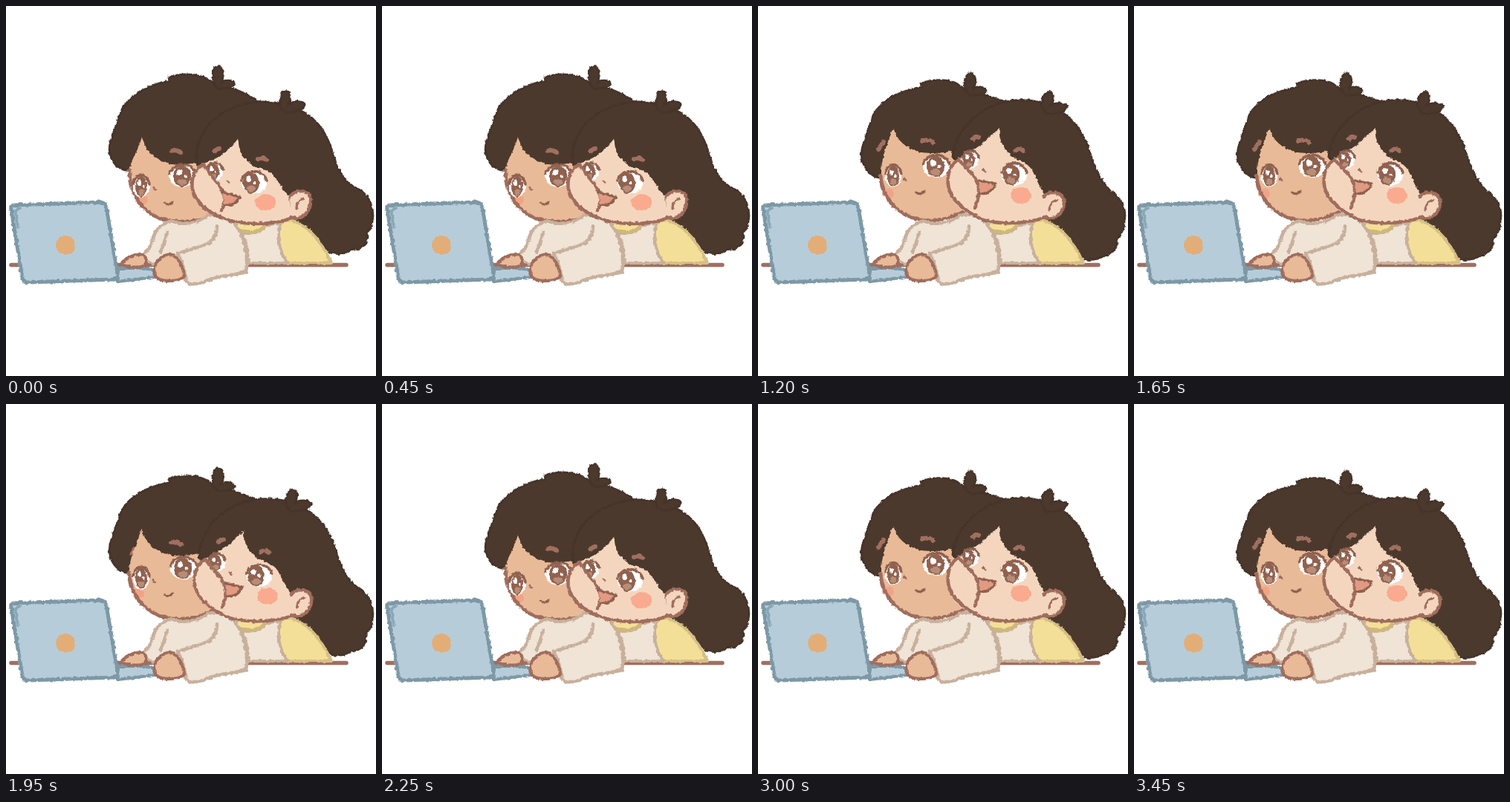
These frames come from a looping animation (498x498 px, 3600 ms). An HTML page:

```html
<!DOCTYPE html>
<html lang="en">
<head>
<meta charset="utf-8">
<style>
html, body { margin: 0; width: 100%; height: 100%; overflow: hidden; background: #fff; }
svg { display: block; width: 498px; height: 498px; }
path { stroke-linecap: round; stroke-linejoin: round; }
</style>
</head>
<body>
<svg viewBox="0 0 498 498">
  <filter id="crayon" x="0" y="0" width="498" height="498" filterUnits="userSpaceOnUse" color-interpolation-filters="sRGB">
    <feTurbulence type="fractalNoise" baseFrequency=".22" numOctaves="2" seed="4"/>
    <feDisplacementMap in="SourceGraphic" scale="4" xChannelSelector="R" yChannelSelector="G"/>
  </filter>
  <path d="M7 348.5H458" stroke="#a06f62" stroke-width="5.5"/>
  <g id="scene" filter="url(#crayon)"></g>
</svg>
<script>
const HAIR = '#4c392d', HAIR_LINE = '#46342a', BROW = '#a06f5f', LINE = '#a06d5d', IRIS = '#90614f';
const TAN = '#e9ba97', PALE = '#f4d6be', KNIT = '#efe4d5', KNIT_LINE = '#c8b09c', YELLOW = '#f4df98';
const BLUE = '#b6cdd9', BLUE_LINE = '#7d98a6';
const scene = document.getElementById('scene');
const moving = [];

// Adds a path; with a second pose it is blended between the two.
function add(fill, stroke, width, low, high) {
  const el = document.createElementNS('http://www.w3.org/2000/svg', 'path');
  el.setAttribute('fill', fill);
  el.setAttribute('stroke', stroke);
  el.setAttribute('stroke-width', width);
  el.setAttribute('d', low);
  scene.append(el);
  if (high) moving.push({ el, low, to: high.match(/-?[\d.]+/g).map(Number) });
}
const line = (color, width, low, high) => add('none', color, width, low, high);
const oval = (x, y, rx, ry) => `M${x - rx} ${y}a${rx} ${ry} 0 1 0 ${2 * rx} 0a${rx} ${ry} 0 1 0 ${-2 * rx} 0Z`;
const spot = (fill, [x, y], [u, v], rx, ry) => add(fill, 'none', 0, oval(x, y, rx, ry), oval(u, v, rx, ry));

function eye(low, high, rx, ry, whiteRx, whiteShift) {
  const at = (dx, dy) => [[low[0] + dx, low[1] + dy], [high[0] + dx, high[1] + dy]];
  const lash = ([x, y]) =>
    `M${x - whiteRx} ${y - 3}C${x - whiteRx * .7} ${y - ry * 1.4} ${x + whiteRx * .7} ${y - ry * 1.4} ${x + whiteRx} ${y - 3}`;
  spot('#fff', ...at(whiteShift, 0), whiteRx, ry + 1);
  spot(IRIS, ...at(0, 0), rx, ry);
  spot('#b78d77', ...at(0, ry * .55), rx * .55, ry * .3);
  spot('#fff', ...at(-rx * .3, -ry * .35), rx * .3, ry * .28);
  spot('#fff', ...at(rx * .4, 0), rx * .18, ry * .16);
  const [a, b] = at(whiteShift, 0);
  line(IRIS, 3.5, lash(a), lash(b));
}

// Boy's head
add(HAIR, HAIR_LINE, 3,
  'M168 221C150 223 136 206 140 184C146 166 150 155 156 140C165 122 190 106 220 101L219 96C235 91 250 91 262 95C273 98 278 102 281 106C305 108 325 119 345 132L345 200L255 215Z',
  'M168 232C150 231 136 212 140 192C146 173 150 160 156 146C165 128 190 114 222 109L219 104C235 99 250 98 264 103C272 106 276 110 281 115C300 118 315 122 335 130L345 200L255 215Z');
add(HAIR, HAIR_LINE, 3, 'M281 106C275 92 280 79 287 81C295 87 293 98 288 104C296 97 309 101 307 106C302 111 294 111 286 112Z',
  'M281 116C274 101 281 89 288 91C295 96 293 106 289 112C297 105 308 111 307 116C302 121 294 120 286 121Z');
line(BROW, 6, 'M181 214L182 213', 'M162 193L169 183');
add(TAN, 'none', 0,
  'M183 176C188 196 200 208 222 213C236 215 248 213 262 209L275 240L284 283C262 291 235 293 207 286C182 276 167 255 166 222C168 206 178 195 183 176Z',
  'M182 164C187 182 200 192 220 197C236 199 250 198 264 194L275 240L284 276C262 288 232 294 205 284C180 274 167 252 166 228C165 206 174 186 182 164Z');
spot('#f0a486', [183, 261], [175, 252], 8, 7);
line(LINE, 4.5, 'M166 222C167 252 182 276 207 286C235 293 260 290 280 282', 'M165 228C167 252 180 274 205 284C232 294 260 286 282 274');
line(BROW, 6, 'M223 195Q229 193 235 197', 'M222 181Q230 179 236 184');
eye([182, 243], [182, 229], 8, 14, 11, 0);
eye([237, 229], [239, 216], 12, 14, 18, 1);
line(LINE, 3, 'M199 245L201 247', 'M197 232L199 235');
line(IRIS, 3, 'M214 265Q219 270 224 264', 'M213 251Q219 255 224 249');

// Girl's hair
add(HAIR, HAIR_LINE, 3,
  'M258 215C253 190 262 162 295 142C320 128 350 125 380 134C415 145 432 168 440 200C448 225 455 238 475 247C490 255 496 275 493 290Q492 300 485 305C489 320 478 329 465 327C456 335 446 334 437 332L400 300L330 260Z',
  'M262 203C263 185 275 160 300 143C322 128 352 122 385 131C420 143 438 168 447 198C453 220 462 236 475 250C490 260 496 274 493 290Q493 304 483 312C484 326 477 334 466 336C458 341 448 342 440 341L400 300L330 260Z');
add(HAIR, HAIR_LINE, 3, 'M370 139C366 125 372 113 378 115C384 120 383 128 379 134C387 126 402 128 402 133C399 141 388 143 377 143Z',
  'M384 139C379 126 387 113 394 116C400 121 398 129 394 134C402 128 416 132 416 136C412 144 401 145 388 145Z');

// Girl's body
add(YELLOW, '#d6bf86', 4, 'M303 293L382 288C405 292 425 318 438 346L330 346Z');
add(KNIT, KNIT_LINE, 3.5, 'M316 305Q337 310 350 295L370 292Q361 320 379 346L326 346Q327 320 316 305Z');
add(YELLOW, '#cfb878', 4, 'M304 292Q315 307 333 304Q346 302 351 290Z');

// Sweater
add(KNIT, KNIT_LINE, 4.5, 'M222 289Q248 299 272 282C302 274 318 302 322 325Q326 345 323 358C300 364 285 363 272 369Q260 375 246 374Q240 368 238 355L205 350Q188 345 183 335Q195 328 198 312Q203 295 222 289Z');
line(KNIT_LINE, 4.5, 'M231 333Q253 327 274 319Q285 308 284 296M217 304Q214 318 208 331M231 333Q240 350 243 371');

// Laptop
add(BLUE, BLUE_LINE, 4, 'M149 353L192 353Q204 357 199 365L150 371Z');
add(BLUE, BLUE_LINE, 5, 'M9 268L126 264Q133 264 135 271L150 360Q151 367 144 368L29 372Q23 372 22 366L7 274Q6 269 9 268Z');
line('#89a7b7', 3.5, 'M16 298L13 280Q12 274 19 272');
add('#e3ad78', 'none', 0, oval(80, 322, 13, 13));

// Hands
add(TAN, LINE, 4, 'M155 348Q165 334 184 334Q192 342 187 350Q171 354 155 348Z');
add(TAN, LINE, 4, 'M200 362C197 349 206 336 221 334C231 337 237 347 240 362Q239 369 221 370Q204 370 200 362Z');

// Girl's face
add(PALE, 'none', 0,
  'M313 179C312 194 320 209 337 217C350 221 358 223 362 231C370 242 375 250 381 257L385 286C350 297 320 293 298 288C275 282 255 265 251 245C249 230 254 216 266 212C285 206 300 195 313 179Z',
  'M325 164C323 180 332 197 348 206C359 210 366 215 370 223C376 236 380 246 386 253L388 286C350 296 320 293 300 287C275 279 256 262 256 243C254 228 260 213 269 206C290 196 308 181 325 164Z');
spot('#f9aa8f', [349, 264], [354, 255], 14, 11);
eye([279, 223], [284, 207], 8, 11, 11, 2);
eye([330, 238], [341, 227], 11, 14, 17, 4);
add(PALE, 'none', 0,
  'M266 213C272 229 291 238 294 258Q295 267 290 275C270 274 254 260 251 240Q252 222 266 213Z',
  'M270 206C280 220 297 230 297 247Q297 260 292 272C275 272 258 260 256 241Q257 219 270 206Z');
line(LINE, 4.5, 'M266 213C272 229 291 238 294 258Q295 267 290 275', 'M270 206C280 220 297 230 297 247Q297 260 292 272');
line(LINE, 4.5,
  'M266 213C246 224 247 248 259 263C270 277 285 284 302 289C325 294 355 295 384 286',
  'M270 206C253 218 251 242 264 260C275 273 288 281 303 288C325 294 355 294 386 285');
add('#e39a82', IRIS, 3.5, 'M291 250Q303 254 315 257Q308 270 294 268', 'M298 235Q309 238 320 239Q313 255 299 252');
line(LINE, 3, 'M298 236L300 238', 'M303 220L306 223');
line(BROW, 6, 'M281 196Q284 192 287 192', 'M289 179Q293 176 297 176');
line(BROW, 6, 'M339 206Q345 203 350 207', 'M347 194Q352 191 357 195');
add(PALE, LINE, 4.5, 'M382 257C389 246 408 246 410 260C411 278 398 290 383 284', 'M385 257C392 247 410 250 412 263C412 280 400 289 385 284');
line(LINE, 3, 'M401 259Q390 262 391 273', 'M403 261Q392 264 392 275');

function setPose(amount) {
  for (const { el, low, to } of moving) {
    let i = 0;
    el.setAttribute('d', low.replace(/-?[\d.]+/g, n => +(+n + (to[i++] - n) * amount).toFixed(2)));
  }
}

const POSES = [0, .6, 1], STEP = 150, start = performance.now();
let shown = -1;
function tick() {
  const pose = Math.floor((performance.now() - start) / STEP) % POSES.length;
  if (pose !== shown) setPose(POSES[shown = pose]);
  requestAnimationFrame(tick);
}
tick();
</script>
</body>
</html>
```
